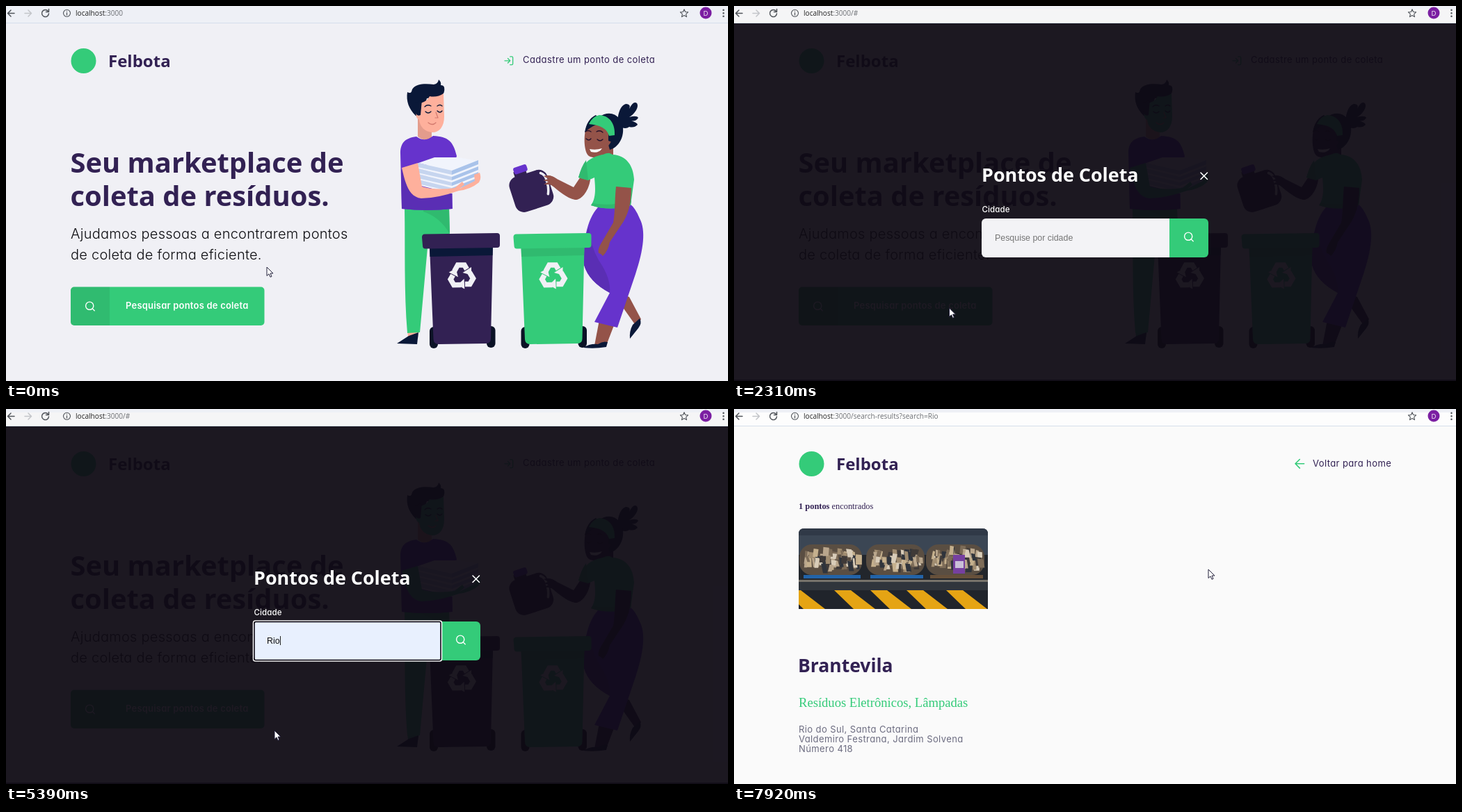
An HTML page for the animation above (8 s loop, 1038 by 540 pixels).

```html
<!DOCTYPE html>
<html lang="pt">
<head>
<meta charset="utf-8">
<title>Pontos de coleta</title>
<style>
html, body { margin: 0; width: 100%; height: 100%; overflow: hidden; background: #f0f0f5 }
svg { display: block }
.title { font-family: "Open Sans", "Noto Sans", sans-serif; font-weight: 700; fill: #322153 }
.round { font-family: Inter, Lato, sans-serif; font-feature-settings: "cv11"; font-size: 13px; letter-spacing: .4px; fill: #322153 }
.lead { font-size: 20px; font-weight: 350; letter-spacing: .25px; fill: #0c0c10 }
.ui { font-family: "Open Sans", "Noto Sans", sans-serif; font-size: 10.1px; fill: #222 }
.serif { font-family: "Liberation Serif", serif }
.field { font-family: "Liberation Sans", sans-serif; font-size: 12.4px }
.small { font-family: "Open Sans", "Noto Sans", sans-serif; font-size: 9.6px; font-weight: 500; fill: #111 }
.line { fill: none; stroke-linecap: round; stroke-linejoin: round }
.navy { fill: #0a1838 }
.green { fill: #34cb79 }
.moss { fill: #30ba6f }
.violet { fill: #6633cc }
.shade { fill: #5a2eb4 }
.plum { fill: #322153 }
.skin { fill: var(--skin) }
.brown { fill: var(--brown) }
#home { --skin: #feb09c; --brown: #945349 }
#home.dim { --skin: #30c080; --brown: #302050 }
</style>
</head>
<body>
<svg width="1038" height="540" viewBox="0 0 1038 540">
<defs>
  <g id="logo">
    <circle class="green" cx="111.5" cy="79" r="18"/>
    <text class="title" x="147" y="88" font-size="24">Felbota</text>
  </g>
  <g id="search" class="line" stroke="#fff" stroke-width="2"><circle cx="11" cy="11" r="8"/><path d="M21 21l-4.4-4.4"/></g>
  <g id="turn">
    <path d="M-10.500-7L-5.500-16H4L7.500-10" fill="none" stroke="#f0f0f5" stroke-width="7.500"/>
    <path d="M1.500-5L14-13L14-1.500Z" fill="#f0f0f5"/>
  </g>
  <g id="bin">
    <rect x="609" y="462" width="12" height="31" rx="6" fill="#0b1226"/>
    <rect x="691" y="461" width="12.5" height="31" rx="6" fill="#0b1226"/>
    <path d="M609 346L700 345L697 479Q697 486 690 486L622 487Q615 487 614.500 480Z" fill="var(--body)"/>
    <path d="M609 346L700 345L699.500 359L609.500 361Z" fill="var(--band)"/>
    <path d="M602 328.500L706 327Q710 327 710 331V344Q710 348 706 348L603 349.500Q599 349.500 599 345L598 333Q598 328.500 602 328.500Z" fill="var(--body)"/>
    <g transform="translate(655 389)">
      <use href="#turn"/><use href="#turn" transform="rotate(120)"/><use href="#turn" transform="rotate(240)"/>
    </g>
  </g>
  <g id="sheet">
    <path d="M593 226L616 218L650 218L679 223L641 238Z" fill="#f1f4fc"/>
    <path d="M593 226L641 238V246L593 234Z" fill="#f1f4fc"/>
    <path d="M641 238L679 223V231L641 246Z" fill="#f1f4fc"/>
    <path d="M592 226L641 237V243L592 232Z" fill="#c6d5ef"/>
    <path d="M641 237L679 222V228L641 243Z" fill="#a9c3ea"/>
  </g>
  <clipPath id="photo"><path d="M93 288V180Q93 172 101 172H357Q365 172 365 180V288Z"/></clipPath>
</defs>

<g id="home">
  <rect y="25" width="1038" height="515" fill="#f0f0f5"/>
  <use href="#logo"/>
  <path class="line" transform="translate(715 71) scale(.65)" stroke="#34cb79" stroke-width="2" d="M15 3h4a2 2 0 0 1 2 2v14a2 2 0 0 1-2 2h-4M10 17l5-5-5-5M15 12H3"/>
  <text class="round" x="743" y="82">Cadastre um ponto de coleta</text>
  <g class="title" font-size="39.900"><text x="92.500" y="240">Seu marketplace de</text><text x="92.500" y="288">coleta de resíduos.</text></g>
  <g><text class="round lead" x="93" y="335">Ajudamos pessoas a encontrarem pontos</text><text class="round lead" x="93" y="364.500">de coleta de forma eficiente.</text></g>
  <rect id="cta" x="93" y="404.500" width="278.500" height="55.500" rx="5"/>
  <path d="M149 404.500H98a5 5 0 0 0-5 5V455a5 5 0 0 0 5 5H149Z" fill="#000" fill-opacity=".08"/>
  <use href="#search" transform="translate(112.500 424) scale(.7)"/>
  <text class="round" x="172" y="436" style="fill:#fff;font-weight:600;letter-spacing:.2px">Pesquisar pontos de coleta</text>

  <!-- man -->
  <path class="skin" d="M577 464H594L592 478H578Z"/>
  <path class="navy" d="M562 486L579 475L593 470L591 487Z"/>
  <path class="green" d="M573 290H637L638 335L606 348L595 470L577 471C572 410 574 350 573 290Z"/>
  <path class="moss" d="M600 291H637L638 328Q624 304 600 296Z"/>
  <path d="M592 160H612V190Q602 196 592 188Z" fill="#e39c8c"/>
  <path class="violet" d="M590 188C573 190 567 198 567 212L569 292Q605 296 642 292L641 240L648 216C643 195 636 188 614 187Q602 197 590 188Z"/>
  <path class="shade" d="M568 236L590 229L598 272L641 258V292Q605 296 569 292Z"/>
  <path class="navy" d="M589 158C579 148 575 137 577 124C583 127 583 123 584 120C590 111 604 112 615 113Q621 112 622 106Q626 109 625 114Q629 114 630 117Q632 129 620 131L605 133L597 160Z"/>
  <path class="skin" d="M596 140Q606 137 609 130Q620 132 629 126L630 159C630 174 623 182 613 182C602 181 595 174 594 164Q588 161 590 152Q593 148 596 153Z"/>
  <path class="navy" d="M588 140L598 135L596 157Q590 160 588 151Z"/>
  <path class="line" d="M603 152q4 4 8 0M620 151q4 4 7 0M602 145q4-4 9-1M620 144q4-3 7 0" stroke="#0a1838" stroke-width="1.300"/>
  <path class="line" d="M618 153l3 8h-4M607 168q6 5 11 0" stroke="#d2786d" stroke-width="1.200"/>
  <use href="#sheet" y="24"/><use href="#sheet" y="16"/><use href="#sheet" y="8"/><use href="#sheet"/>
  <path class="skin" d="M569 233L592 226L598 260Q617 266 645 262L656 253L659 257L652 263L674 252L673 243L681 240Q684 248 680 254Q668 264 651 266Q620 277 597 277C579 275 574 255 569 233Z"/>

  <!-- woman -->
  <path class="brown" d="M886 415L896 419L913 451L906 461L884 430Z"/>
  <path class="navy" d="M911 450Q915 456 909 464L897 479Q896 468 901 459Z"/>
  <path class="brown" d="M853 452L874 460L864 486L846 489Z"/>
  <path class="navy" d="M830 492Q839 486 851 487Q858 482 865 484L863 491Q846 494 830 492Z"/>
  <path class="violet" d="M854 287C837 302 829 335 831 373Q838 397 868 413L846 455L879 463L905 386C917 350 920 323 911 306Q905 291 897 285Z"/>
  <path class="shade" d="M838 318C831 335 829 352 831 373Q838 397 868 413Q870 392 852 366Q840 345 838 318Z"/>
  <path class="brown" d="M855 198L873 194L873 215L857 217Z"/>
  <path class="navy" d="M880 172C878 158 883 142 892 141Q899 142 896 148Q902 136 907 140C911 146 902 157 896 160Q907 157 909 161Q905 167 898 165Q908 168 908 171Q903 176 896 174Q890 179 880 172Z"/>
  <path class="navy" d="M852 160Q870 148 883 163C893 180 884 203 868 207L862 185Z"/>
  <path class="brown" d="M834 176Q843 164 860 168L872 190Q869 199 864 203C861 217 847 221 838 216C831 211 830 187 834 176Z"/>
  <path class="navy" d="M832 182Q835 163 848 157L858 168Q843 171 832 182ZM866 176L875 180L871 196L866 194Z"/>
  <path class="green" d="M838 170Q843 159 853 157C869 158 876 171 875 186L867 187Q863 172 838 170Z"/>
  <path class="line" d="M834 191q4 4 7 0M850 192q4 4 8 0M833 181q4-3 8 0M849 181q5-3 9 1" stroke="#24122b" stroke-width="1.300"/>
  <path d="M839 206Q848 208 857 205Q852 213 841 210Z" fill="#fff"/>
  <path class="brown" d="M826 246L840 250C838 265 828 280 818 279C806 277 795 266 784 258L773 256L779 252L772 250L780 248L774 244Q783 243 790 248L816 261Z"/>
  <path class="green" d="M858 214Q865 211 868 212L872 214C892 215 902 230 903 250L898 287Q868 296 841 287C849 276 847 260 846 247L837 251L823 247C830 226 838 218 858 214Z"/>
  <path class="moss" d="M843 284Q870 289 899 280L898 287Q868 296 841 287ZM834 222L837 251L823 247Q827 231 834 222Z"/>
  <path class="brown" d="M877 260L899 262C899 286 894 302 884 316L868 340Q866 352 858 360Q855 356 852 356Q850 351 856 341L873 312C876 295 875 278 877 260Z"/>

  <!-- jug -->
  <g transform="rotate(-18 755 267)">
    <rect class="plum" x="739" y="233" width="18" height="12"/>
    <rect class="violet" x="740" y="227" width="20" height="10" rx="3"/>
    <rect class="plum" x="727" y="240" width="57" height="53" rx="13"/>
    <path class="line" d="M776 246q6 4 5 14q0 10-4 18" stroke="#eeeef6" stroke-width="3.500"/>
  </g>
  <path class="brown" d="M773 245Q782 242 792 249L790 257L773 257L780 253L772 251L780 249Z"/>
  <use href="#bin" style="--body:#322153;--band:#0a1838"/>
  <use href="#bin" x="131.500" style="--body:#34cb79;--band:#30ba6f"/>
</g>

<g id="modal">
  <rect y="25" width="1038" height="515" fill="#0e0a14" fill-opacity=".937"/>
  <rect y="538" width="1038" height="2" fill="#120e18"/>
  <text class="title" x="356" y="253" font-size="26.900" style="fill:#fff">Pontos de Coleta</text>
  <path class="line" d="M671 240l9.500 9.500m0-9.500l-9.500 9.500" stroke="#fff" stroke-width="1.600"/>
  <text class="round" x="356.500" y="297" style="font-size:11.5px;font-weight:500;letter-spacing:.1px;fill:#fff">Cidade</text>
  <path id="input" d="M626 306H362a6 6 0 0 0-6 6V356a6 6 0 0 0 6 6H626Z"/>
  <path id="go" d="M626 306H676a6 6 0 0 1 6 6V356a6 6 0 0 1-6 6H626Z"/>
  <use href="#search" transform="translate(645.500 324) scale(.7)"/>
  <text id="value" x="375" y="338"></text>
  <path id="caret" stroke="#222"/>
  <g id="ring" fill="none">
    <rect y="305" height="58" rx="3" stroke="#fff" stroke-width="1.500"/>
    <rect y="306.500" height="55" rx="2" stroke="#0e0a14" stroke-width="1.600"/>
  </g>
  <g id="list">
    <rect x="356" y="363" width="270" height="124" rx="3" fill="#fff"/>
    <rect id="pick" x="356" width="270" height="28" fill="#c8c8c8"/>
    <g class="small"><text x="366" y="386.500">Goiania</text><text x="366" y="414.500">Goiânia</text><text x="366" y="442.500">Luziânia</text><text x="366" y="470.500">Rio</text></g>
  </g>
</g>

<g id="results">
  <rect y="25" width="1038" height="515" fill="#fafafa"/>
  <use href="#logo"/>
  <path class="line" transform="translate(802.500 68) scale(.9)" stroke="#34cb79" stroke-width="1.800" d="M19 12H5M12 19l-7-7 7-7"/>
  <text class="round" x="832" y="82.500">Voltar para home</text>
  <text class="serif plum" x="93" y="144" font-size="12.400"><tspan font-weight="700">1 pontos</tspan> encontrados</text>
  <g id="scene" clip-path="url(#photo)">
    <rect x="93" y="172" width="272" height="116" fill="#3b4654"/>
    <rect x="93" y="172" width="272" height="10" fill="#303947"/>
    <rect x="93" y="210" width="272" height="38" fill="#22262c"/>
  </g>
  <text class="title" x="92" y="379" font-size="26.500">Brantevila</text>
  <text class="serif green" x="93" y="429" font-size="18.600">Resíduos Eletrônicos, Lâmpadas</text>
  <g class="round" style="fill:#6c6c80"><text x="93" y="465.500">Rio do Sul, Santa Catarina</text><text x="93" y="479.500">Valdemiro Festrana, Jardim Solvena</text><text x="93" y="493.500">Número 418</text></g>
</g>

<g id="browser">
  <rect id="bar" width="1038" height="24"/>
  <rect width="1038" height="5" fill="#eef0f6"/>
  <rect y="24" width="1038" height="1" fill="#d5deeb"/>
  <g class="line" stroke="#50545a" stroke-width="1.500">
    <path d="M12 10.500H2.500M7 6l-4.500 4.500L7 15"/>
    <path d="M27 10.500H36.500M32 6l4.500 4.500L32 15" stroke="#c3c5c9"/>
    <path id="reload" d="M60.500 7.500A5 5 0 1 0 61.500 11M61.500 4.500V8.500H57.500"/>
    <path id="stop" d="M52.500 6l8.500 8.500m0-8.500l-8.500 8.500"/>
    <path d="M87.500 9.500V13M87.500 7.300v.1" stroke-width="1.200"/><circle cx="87.500" cy="10.300" r="5" stroke-width="1.100"/>
    <path d="M975 4.800l1.600 3.700 4 .4-3 2.700.9 4-3.500-2.100-3.500 2.100.9-4-3-2.700 4-.4Z" stroke-width="1.100"/>
    <path d="M1031.500 5.800v.1M1031.500 10.300v.1M1031.500 14.800v.1" stroke-width="2.400"/>
  </g>
  <text class="ui" x="100" y="14">localhost<tspan id="path" fill="#6b6e73"></tspan></text>
  <circle cx="1006" cy="10" r="8.500" fill="#7b1fa2"/>
  <text class="ui" x="1006" y="13.500" text-anchor="middle" style="font-size:9.5px;fill:#fff">D</text>
</g>

<g id="cursor">
  <path id="arrow" d="M0 0V12.500L3 9.800L5 14.300L7 13.400L5 9H9Z" fill="#fff" stroke="#22203a"/>
  <path id="beam" class="line" d="M-2-6Q0-6 0-4.500Q0-6 2-6M0-4.500V4.500M-2 6Q0 6 0 4.500Q0 6 2 6" stroke="#111" stroke-width="1.200"/>
</g>
</svg>
<script>
const $ = id => document.getElementById(id);
const show = (id, on) => $(id).style.display = on ? '' : 'none';
const set = (id, attrs) => { for (const k in attrs) $(id).setAttribute(k, attrs[k]); };
const within = (t, a, b) => t >= a && t < b;
// last entry whose start time has passed
const at = (steps, t) => steps.filter(s => s[0] <= t).pop();

function paintScene() {
  let seed = 7, out = '';
  const rnd = () => (seed = seed * 16807 % 2147483647) / 2147483647;
  const poly = (pts, fill) => out += `<polygon points="${pts}" fill="${fill}"/>`;
  const rect = (x, y, w, h, fill, rx = 0) => out += `<rect x="${x}" y="${y}" width="${w}" height="${h}" rx="${rx}" fill="${fill}"/>`;
  const tones = ['#b9a68c', '#7d6c58', '#d8ccb8', '#3f3a38', '#a08c70', '#2f343c', '#c5b08d'];
  for (const [x, w] of [[94, 90], [190, 84], [276, 84]]) {
    rect(x, 195, w, 44, '#5a4e42', 18);
    for (let i = 0; i < 60; i++) {
      const u = rnd() * 2 - 1, px = x + w / 2 + u * (w / 2 - 8), fall = 8 * u * u;
      const py = 196 + fall + rnd() * (28 - 2 * fall), s = rnd() * 6 - 3;
      const pw = 3 + rnd() * 6, ph = 8 + rnd() * 7;
      poly([px, py, px + pw, py + 1, px + pw + s, py + ph, px + s, py + ph], tones[i % 7]);
    }
    rect(x + 6, 239, w - 8, 5, x < 200 ? '#2263a8' : '#66503a');
  }
  rect(315, 210, 17, 27, '#7640a0');
  rect(318, 219, 12, 10, '#c9bfd8');
  rect(93, 246, 272, 3, '#77736b');
  rect(93, 249, 272, 12, '#30353c');
  rect(93, 261, 272, 27, '#20242b');
  for (const x of [72, 144, 196, 248, 305])
    poly([x, 261, x + 24, 261, x + 59, 288, x + 28, 288], '#e5a414');
  $('scene').insertAdjacentHTML('beforeend', out);
}

const moves = [[0, 375, 376], [280, 374.5, 376], [430, 368, 379], [580, 365, 379.5], [1210, 364, 380],
  [1460, 359, 383], [1610, 330, 412], [1740, 304, 438], [2170, 309.5, 435], [2720, 360, 392],
  [2840, 412, 344.5], [2990, 430, 338], [4630, 411, 402], [4750, 393.5, 456], [4880, 388, 462],
  [5000, 386, 463], [5840, 464, 422], [5990, 570, 385], [6120, 667, 349], [7770, 667, 278], [7920, 682, 231]];
const values = [[0, 'Pesquise por cidade', 'field', '#757575'], [4630, 'Goiânia', 'small', '#111'],
  [4750, 'Luziânia', 'small', '#111'], [4880, 'Rio', 'small', '#111'], [5260, 'Rio', 'field', '#111']];
const rows = [[0, -1], [4630, 1], [4750, 2], [4880, 3]];
const paths = [[0, ':3000'], [2310, ':3000/#'], [6700, ':3000/search-results?search=Rio']];

function draw(t) {
  const modal = within(t, 2310, 6820), results = t >= 6820;
  show('home', !results);
  show('modal', modal);
  show('results', results);
  $('home').classList.toggle('dim', modal);
  set('cta', { fill: at([[0, '#34cb79'], [1610, '#32c274'], [1740, '#2fb86e']], t)[1] });

  set('bar', { fill: results ? '#fdfdfd' : modal ? '#f5f5f6' : '#eef0f6' });
  const loading = within(t, 6700, 6820);
  show('reload', !loading);
  show('stop', loading);
  $('path').textContent = at(paths, t)[1];

  const [, text, style, color] = at(values, t);
  $('value').textContent = text;
  set('value', { class: style, style: `fill:${color}` });
  set('input', { fill: t < 3250 ? '#f3f3f6' : t < 4630 ? '#f0f0f5' : '#e8f0fe' });
  set('go', { fill: t < 6120 ? '#34cb79' : '#2fb85f' });
  show('list', within(t, 3250, 5260));
  const row = at(rows, t)[1];
  show('pick', row >= 0);
  set('pick', { y: 369 + row * 27.9 });
  show('caret', within(t, 3250, 3690) || within(t, 4200, 5260) || within(t, 5390, 5990));
  set('caret', { d: `M${t < 5260 ? 375.5 : 394.5} 327V340` });

  const onButton = t >= 6280;
  show('ring', t >= 3250);
  [...$('ring').children].forEach((r, i) => {
    r.setAttribute('x', (onButton ? 625.5 : 355.5) + i * 1.5);
    r.setAttribute('width', (onButton ? 57 : 271) - i * 3);
  });

  const [, x, y] = at(moves, t), beam = within(t, 2840, 4630);
  set('cursor', { transform: `translate(${x} ${y})` });
  show('beam', beam);
  show('arrow', !beam);
}

function tick() {
  draw(performance.now() % 8000);
  requestAnimationFrame(tick);
}
paintScene();
tick();
</script>
</body>
</html>
```
